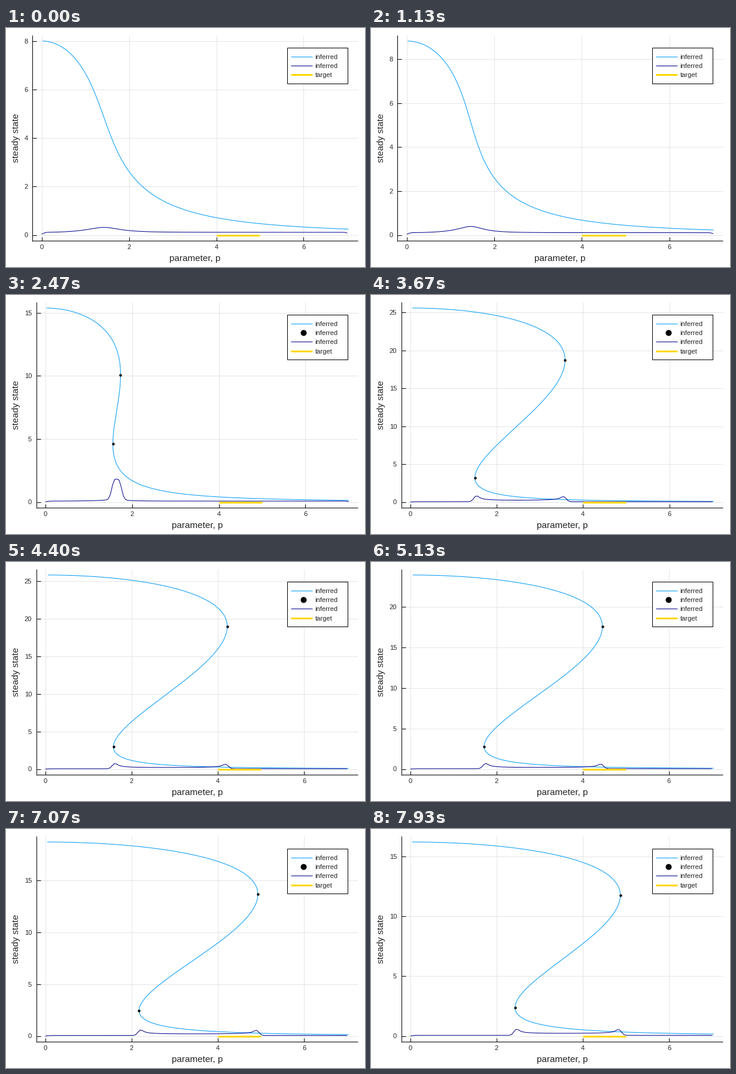
Write a matplotlib script that moves like this. It is 600 by 400 pixels and loops after 8 s.

```python
import numpy as np
import matplotlib.pyplot as plt
from matplotlib.animation import FuncAnimation
from matplotlib.patches import Rectangle

W, H, DPI = 600, 400, 100
N, LOOP = 120, 8000
RIGHT, TOP, BOTTOM = 588, 12, 356.3
ZERO_Y, SPAN_Y = 346.5, 324.75
PX = 72 / DPI
BLUE, NAVY, GOLD, INK = "#009AFA", "#00008B", "#FFD700", "#262626"

plt.rcParams["font.family"] = "Liberation Sans"

# Model parameters along the training run: p = q (1 + k u^2) / c, u = top / (1 + q^2)
KEYS = np.array([0, 17, 37, 55, 77, 92, 119])
TOPS = np.array([8.0, 9.0, 15.37, 25.6, 23.81, 21.43, 15.99])
GAINS = np.array([0.018, 0.0195, 0.0261, 0.0389, 0.0510, 0.0593, 0.0738])
RATES = np.array([0.805, 0.892, 1.525, 2.475, 2.223, 1.947, 1.384])
ENDS = np.array([7.03, 7.006, 7.0, 7.03, 7.045, 7.045, 7.03])
GRID_P = np.linspace(0, 7, 141)
BANDWIDTH = 0.05


def smooth(i, vals):
    """Cubic Hermite interpolation through the key values."""
    slopes = np.gradient(vals, KEYS)
    j = min(np.searchsorted(KEYS, i, side="right") - 1, len(KEYS) - 2)
    h = KEYS[j + 1] - KEYS[j]
    t = (i - KEYS[j]) / h
    return ((1 + 2 * t) * (1 - t) ** 2 * vals[j]
            + t * (1 - t) ** 2 * h * slopes[j]
            + t * t * (3 - 2 * t) * vals[j + 1]
            + t * t * (t - 1) * h * slopes[j + 1])


def branch(top, k, c, end):
    q = np.linspace(0, c * end * 1.05, 4000)
    u = top / (1 + q * q)
    p = q * (1 + k * u * u) / c
    keep = (p > 0.02) & (p <= end)
    return p[keep], u[keep]


def folds(p, u):
    turn = np.diff(np.sign(np.diff(p)))
    idx = np.nonzero(turn)[0] + 1
    return p[idx], u[idx]


def density(p, u, k, c):
    """Kernel density of the branch points, spaced evenly by arclength."""
    v = c / (1 + k * u * u)
    ds = np.sqrt(np.diff(p) ** 2 + 0.25 * np.diff(u) ** 2 + 5 * np.diff(v) ** 2)
    mid = (p[1:] + p[:-1]) / 2
    z = (GRID_P[:, None] - mid) / BANDWIDTH
    kernel = np.exp(-z * z / 2) / (BANDWIDTH * np.sqrt(2 * np.pi))
    return kernel @ ds / ds.sum()


def y_ticks(top):
    limit = top * 1.03
    if limit < 10:
        step, fmt, left = 2, "%d", 44.3
    elif limit < 15:
        step, fmt, left = 2.5, "%.1f", 59.8
    else:
        step, fmt, left = 5, "%d", 50.6
    return np.arange(0, limit, step), fmt, left


fig = plt.figure(figsize=(W / DPI, H / DPI), dpi=DPI, facecolor="white")
ax = fig.add_axes([0, 0, 1, 1])


def line(x, y, color="black", width=1.0, **kw):
    ax.plot(x, y, color=color, lw=width * PX, solid_capstyle="butt", **kw)


def dots(x, y, size):
    ax.plot(x, y, "o", color="black", ms=size * PX, mew=0)


def text(x, y, s, size=8, **kw):
    ax.text(x, y, s, fontsize=size, color=INK, va="baseline", **kw)


def legend(has_folds):
    rows = [("inferred", BLUE, 1), ("inferred", NAVY, 1), ("target", GOLD, 3)]
    if has_folds:
        rows.insert(1, ("inferred", None, 0))
    ax.add_patch(Rectangle((469.5, 32.5), 101, 15.2 * len(rows) + 15,
                           fc="white", ec="black", lw=PX, zorder=3))
    for n, (name, color, width) in enumerate(rows):
        y = 47.9 + 15.2 * n
        if color:
            line([475.5, 511.5], [y, y], color, width, zorder=4)
        else:
            ax.plot([496.5], [y], "o", color="black", ms=10 * PX, mew=0, zorder=4)
        text(516.5, y + 4, name, zorder=4)


def draw(i):
    ax.clear()
    ax.set(xlim=(0, W), ylim=(H, 0))
    ax.axis("off")

    top, k, c = (smooth(i, vals) for vals in (TOPS, GAINS, RATES))
    end = np.interp(i, KEYS, ENDS)
    ticks, fmt, left = y_ticks(top)
    width = RIGHT - left

    def px(p):
        return left + width * (0.03 + np.asarray(p) / end) / 1.06

    def py(u):
        return ZERO_Y - SPAN_Y * np.asarray(u) / top

    for t in (0, 2, 4, 6):
        x = px(t)
        line([x, x], [TOP, BOTTOM], "#e5e5e5")
        line([x, x], [BOTTOM, BOTTOM - 6], zorder=2.5)
        text(x, 370, str(t), ha="center")
    for t in ticks:
        y = py(t)
        line([left, RIGHT], [y, y], "#e5e5e5")
        line([left, left + 7], [y, y], zorder=2.5)
        text(left - 7.5, y + 4, fmt % t, ha="right")
    line([left, left], [TOP, BOTTOM + 0.5], zorder=2.5)
    line([left, RIGHT], [BOTTOM, BOTTOM], zorder=2.5)
    text((left + RIGHT) / 2, 390, "parameter, p", 11, ha="center")
    ax.text(21, (TOP + BOTTOM) / 2, "steady state", fontsize=11, color=INK,
            rotation=90, rotation_mode="anchor", ha="center", va="baseline")

    p, u = branch(top, k, c, end)
    fp, fu = folds(p, u)
    line(px(p), py(u), BLUE)
    dots(px(fp), py(fu), 4.4)
    line(px(GRID_P), py(density(p, u, k, c)), NAVY)
    line(px([4, 5]), py([0, 0]), GOLD, 3)
    legend(len(fp) > 0)
    return []


anim = FuncAnimation(fig, draw, frames=N, interval=LOOP / N, repeat=True,
                     repeat_delay=0, blit=False)
plt.show()
```
